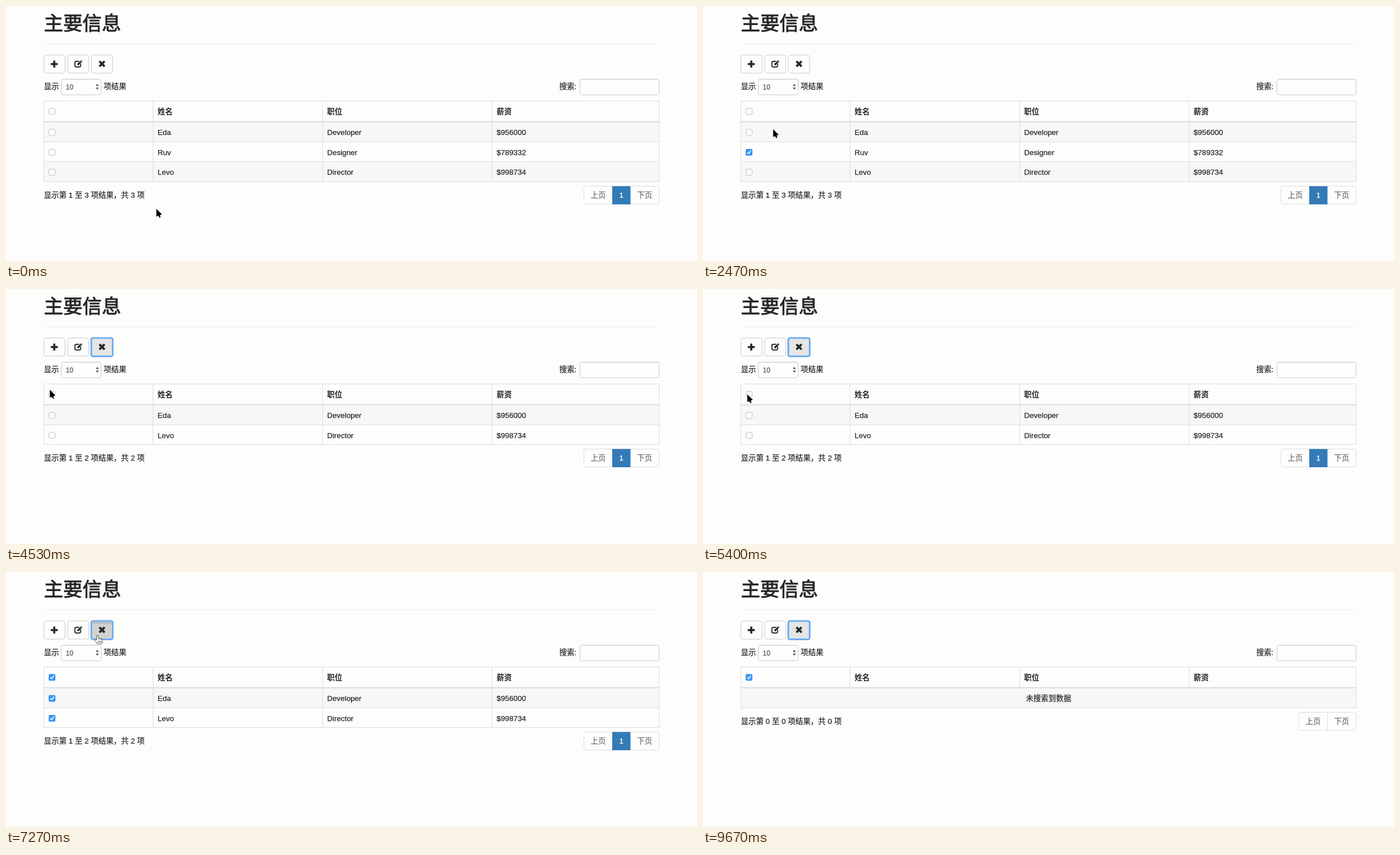
Write an HTML page with a canvas that moves like this. It is 1231 px wide and 455 px high and loops after 9.74 s.

```html
<!DOCTYPE html>
<html lang="zh">
<head>
<meta charset="utf-8">
<title>主要信息</title>
<style>
html, body { margin: 0; width: 100%; height: 100%; overflow: hidden; background: #fdfdfc; }
canvas { display: block; width: 1231px; height: 455px; }
</style>
</head>
<body>
<canvas id="stage" width="1231" height="455"></canvas>
<script>
const ctx = document.getElementById('stage').getContext('2d');
const LOOP = 9740, STEP = 1000 / 15;
const FONT = '"Liberation Sans", "Noto Sans CJK SC", "Noto Sans CJK", sans-serif';
const LEFT = 67, RIGHT = 1164, WIDTH = RIGHT - LEFT;
const HEAD_TOP = 169, BODY_TOP = 207, ROW = 35.6;
const BG = '#fdfdfc', INK = '#262626', LINE = '#dcdcde', EDGE = '#c9c9c9', BLUE = '#337ab7';

const columnX = i => 262 + 302 * i;

const PEOPLE = [
  ['Eda', 'Developer', '$956000'],
  ['Ruv', 'Designer', '$789332'],
  ['Levo', 'Director', '$998734']
];

// Moments of each click, in ms
const PICK = 1860, DELETE_ONE = 3330, PICK_ALL = 5660, DELETE_ALL = 7330, HOLD = 140;

// Pointer stops
const STOPS = [
  { t: 0, x: 268, y: 362 },
  { t: 1400, x: 62, y: 266 },
  { t: PICK, x: 82, y: 257 },
  { t: 2470, x: 125, y: 220 },
  { t: 3130, x: 180, y: 113 },
  { t: 4070, x: 180, y: 113 },
  { t: 4700, x: 57, y: 194 },
  { t: 5400, x: 79, y: 188 },
  { t: 6000, x: 79, y: 188 },
  { t: 6930, x: 164, y: 113 },
  { t: 7400, x: 164, y: 113 },
  { t: 8200, x: 667, y: 340 },
  { t: 8930, x: 700, y: 475 }
];

function pointerAt(t) {
  const next = STOPS.findIndex(stop => stop.t > t);
  if (next < 0) return STOPS[STOPS.length - 1];
  const a = STOPS[next - 1], b = STOPS[next];
  const k = (t - a.t) / (b.t - a.t), e = k * k * (3 - 2 * k);
  return { x: a.x + (b.x - a.x) * e, y: a.y + (b.y - a.y) * e };
}

function text(str, x, y, { size = 13.46, color = INK, weight = 400, align = 'left', bold = 0.25 } = {}) {
  ctx.font = `${weight} ${size}px ${FONT}`;
  ctx.textAlign = align;
  ctx.fillStyle = ctx.strokeStyle = color;
  ctx.lineWidth = bold;
  ctx.fillText(str, x, y);
  ctx.strokeText(str, x, y);
}

function rect(x, y, w, h, color) {
  ctx.fillStyle = color;
  ctx.fillRect(x, y, w, h);
}

function box(x, y, w, h, r, fill, stroke, width = 1) {
  ctx.beginPath();
  ctx.roundRect(x, y, w, h, r);
  if (fill) { ctx.fillStyle = fill; ctx.fill(); }
  if (stroke) { ctx.strokeStyle = stroke; ctx.lineWidth = width; ctx.stroke(); }
}

// A bar centred on a point and turned by an angle
function bar(x, y, w, h, angle, color, r = 0) {
  ctx.save();
  ctx.translate(x, y);
  ctx.rotate(angle);
  box(-w / 2, -h / 2, w, h, r, color);
  ctx.restore();
}

function cross(x, y, size, width, angle) {
  bar(x, y, size, width, angle, INK);
  bar(x, y, width, size, angle, INK);
}

function triangle(x, y, height, color) {
  ctx.beginPath();
  ctx.moveTo(x - 2.7, y);
  ctx.lineTo(x + 2.7, y);
  ctx.lineTo(x, y + height);
  ctx.fillStyle = color;
  ctx.fill();
}

function checkbox(y, checked) {
  if (!checked) return box(76.5, y - 5.5, 11, 11, 2.5, '#fefefe', '#bdbdbd');
  box(76, y - 6, 12, 12, 2.5, '#3b95f5');
  bar(80.2, y + 1.4, 1.6, 4, -Math.PI / 4, '#fff');
  bar(83.2, y, 1.6, 7.2, 0.6, '#fff');
}

function topShade(x, y, w, depth, alpha) {
  const g = ctx.createLinearGradient(0, y, 0, y + depth);
  g.addColorStop(0, `rgba(0,0,0,${alpha})`);
  g.addColorStop(1, 'rgba(0,0,0,0)');
  rect(x, y, w, depth, g);
}

function editIcon(x, y) {
  box(x - 5.8, y - 4.9, 10.2, 10, 2.5, null, INK, 1.9);
  bar(x + 3, y - 2.6, 5, 12, Math.PI / 4, BG);
  bar(x + 2, y - 1.4, 3.4, 8, Math.PI / 4, INK);
  bar(x + 5.8, y - 5.2, 3.2, 1.8, Math.PI / 4, INK);
}

function toolbar({ pressed, focus, overButton }) {
  const deleteFill = pressed ? '#d2d2d2' : focus || overButton ? '#e5e5e4' : BG;
  for (let i = 0; i < 3; i++) {
    box(67.5 + 42.4 * i, 87.5, 37.6, 32.3, 4, i === 2 ? deleteFill : BG, EDGE);
  }
  if (pressed) topShade(154, 89, 35, 5, 0.16);
  if (focus) {
    box(152, 87.5, 38, 32.6, 3, null, '#b9d8f6', 4);
    box(152, 87.5, 38, 32.6, 3, null, '#64a7ec', 2.2);
  }
  cross(86, 103.6, 12.4, 3.6, 0);
  editIcon(128.5, 103.6);
  cross(171, 103.2, 13, 3.8, Math.PI / 4);
}

function field(x, w) {
  box(x, 130.5, w, 28, 3, '#fefefd', EDGE);
  topShade(x + 1, 131, w - 2, 2, 0.06);
}

function controls() {
  text('显示', 67.5, 148);
  field(98.5, 71);
  text('10', 106.5, 148.5, { size: 12, color: '#555' });
  triangle(162.7, 142.8, -4, '#555');
  triangle(162.7, 145.4, 4, '#555');
  text('项结果', 174, 148);
  text('搜索:', 985.7, 148);
  field(1022.5, 141);
}

function table(rows, { all, picked }) {
  const count = Math.max(1, rows.length);
  const lineY = i => Math.round(BODY_TOP + ROW * i) - 1;
  const bottom = lineY(count);

  for (let i = 0; i < count; i++) {
    const y = lineY(i), next = lineY(i + 1);
    if (i % 2 === 0) rect(LEFT, y + 1, WIDTH, next - y, '#f7f7f7');
    rect(LEFT, next, WIDTH, 1, LINE);
  }
  rect(LEFT, HEAD_TOP, WIDTH, 1, LINE);
  rect(LEFT, BODY_TOP - 1.5, WIDTH, 2, LINE);
  for (const x of [LEFT, RIGHT - 1]) rect(x, HEAD_TOP, 1, bottom - HEAD_TOP + 1, LINE);

  checkbox(188, all);
  ['姓名', '职位', '薪资'].forEach((label, i) => {
    rect(columnX(i) - 0.5, HEAD_TOP, 1, (rows.length ? bottom : BODY_TOP) - HEAD_TOP, LINE);
    text(label, columnX(i) + 8, 192.5, { weight: 700, bold: 0.01 });
  });

  rows.forEach((person, r) => {
    const mid = 225.5 + 35.5 * r;
    checkbox(mid, all || (picked && person === PEOPLE[1]));
    person.forEach((value, i) => text(value, columnX(i) + 8, mid + 4.6));
  });
  if (!rows.length) text('未搜索到数据', 615.5, 230, { align: 'center' });
  return bottom;
}

function footer(n, bottom) {
  const x = n ? 1029.5 : 1061.5, top = bottom + 8.5, base = top + 20.8;
  const label = { color: '#6e6e6e', align: 'center' };
  text(`显示第 ${n ? 1 : 0} 至 ${n} 项结果，共 ${n} 项`, 67.5, bottom + 29);
  box(x, top, RIGHT - 0.5 - x, 32, 4, BG, LINE);
  text('上页', x + 25.5, base, label);
  text('下页', 1137.7, base, label);
  if (n) {
    rect(1080, top, 32.5, 32.5, BLUE);
    text('1', 1096.3, base, { color: '#fff', align: 'center' });
  } else {
    rect(1112, top, 1, 32, LINE);
  }
}

function arrow() {
  for (const [color, grow] of [['#fff', 1.6], ['#000', 0]]) {
    ctx.beginPath();
    ctx.moveTo(0, 0);
    ctx.lineTo(0, 13.6);
    ctx.lineTo(9.6, 9.8);
    ctx.closePath();
    ctx.fillStyle = ctx.strokeStyle = color;
    ctx.lineWidth = grow || 0.2;
    ctx.fill();
    ctx.stroke();
    bar(4.9, 11.8, 2.6 + grow, 7.4 + grow, -0.4, color);
  }
}

function hand() {
  for (const [color, grow] of [['#111', 1.2], ['#fff', 0]]) {
    for (let i = 0; i < 4; i++) {
      const top = i ? 4.6 + 0.7 * i : 0.8;
      bar(-1.2 + 2.5 * i, (top + 12) / 2, 2.2 + grow, 12 - top + grow, 0, color, 1.2);
    }
    bar(-3, 9.8, 2.4 + grow, 6.6 + grow, -0.7, color, 1.2);
    bar(2.5, 12, 8.6 + grow, 6.4 + grow, 0, color, 2);
  }
  for (let i = 0; i < 3; i++) bar(0.6 + 2.2 * i, 11.6, 0.8, 3.6, 0, '#222');
}

function pointer({ x, y }, shape) {
  ctx.save();
  ctx.translate(x, y);
  ctx.lineJoin = 'round';
  shape();
  ctx.restore();
}

function visibleRows(t) {
  if (t >= DELETE_ALL) return [];
  return t < DELETE_ONE ? PEOPLE : [PEOPLE[0], PEOPLE[2]];
}

function draw(t) {
  const p = pointerAt(t), rows = visibleRows(t);
  const held = click => t >= click - HOLD && t < click;
  const state = {
    overButton: p.x >= 152 && p.x <= 190 && p.y >= 87 && p.y <= 120,
    pressed: held(DELETE_ONE) || held(DELETE_ALL),
    focus: (t >= DELETE_ONE - HOLD && t < PICK_ALL) || t >= DELETE_ALL - HOLD,
    picked: t >= PICK,
    all: t >= PICK_ALL
  };

  rect(0, 0, 1231, 455, BG);
  text('主要信息', 67.5, 43.2, { size: 34.4, bold: 0.9 });
  rect(LEFT, 67, WIDTH, 1, '#eeeef0');
  toolbar(state);
  controls();
  footer(rows.length, table(rows, state));
  pointer(p, state.overButton ? hand : arrow);
}

function tick() {
  const t = performance.now() % LOOP;
  draw(Math.floor((t + 5) / STEP) * STEP);
  requestAnimationFrame(tick);
}
tick();
</script>
</body>
</html>
```
